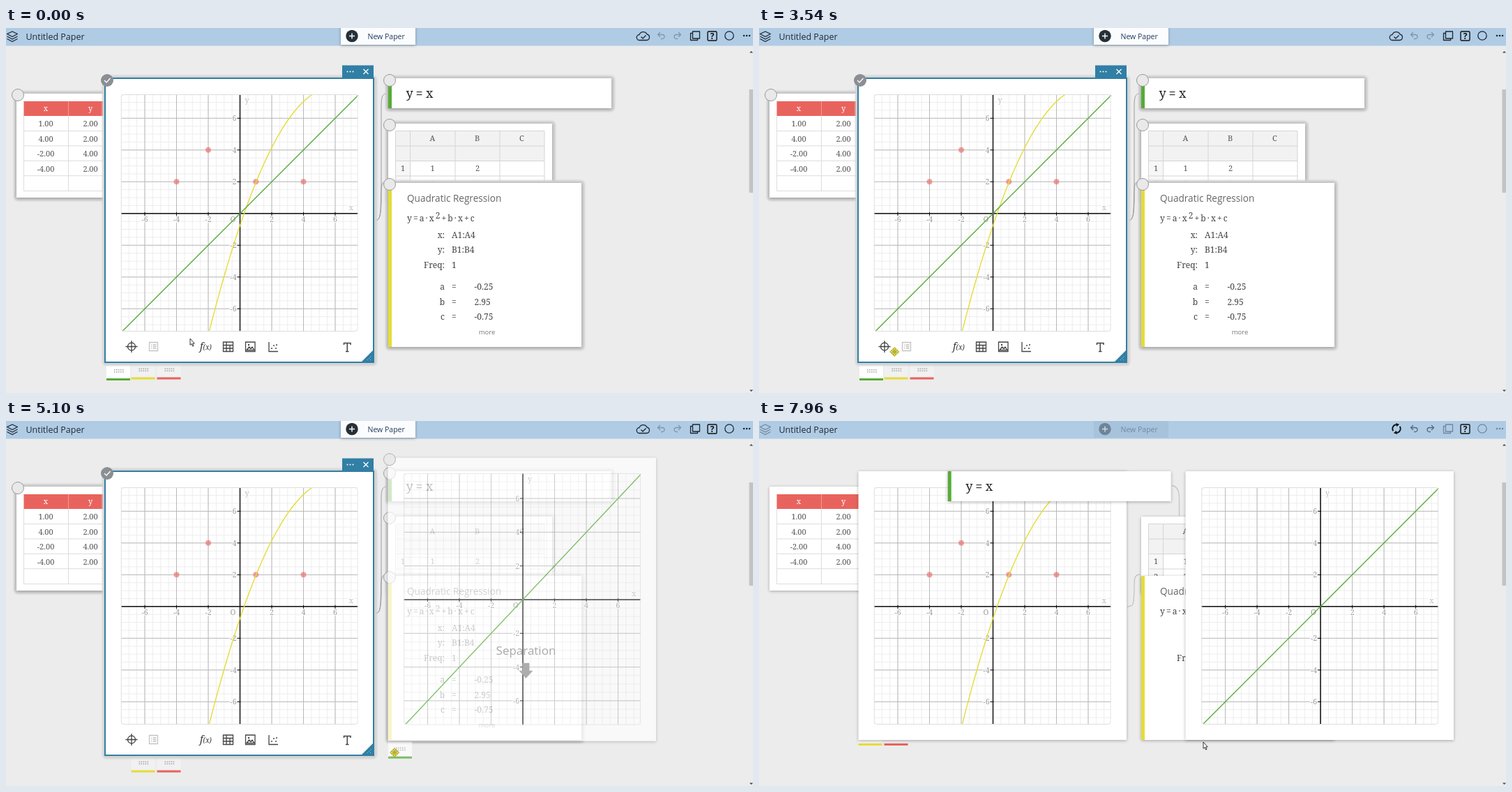
An HTML page for the animation above (8000 ms loop, 1071 by 523 pixels).

```html
<!DOCTYPE html>
<html lang="en">
<head>
<meta charset="utf-8">
<title>Graph paper</title>
<style>
html, body { margin: 0; width: 100%; height: 100%; overflow: hidden; background: #ececec; }
svg { display: block; }
text { font-family: "Noto Serif", serif; font-size: 11px; fill: #555; }
.sans { font-family: "Open Sans", sans-serif; }
.mid { text-anchor: middle; }
.end { text-anchor: end; }
.card { filter: drop-shadow(0 1.5px 2px rgba(0,0,0,.3)); }
.line { fill: none; stroke: #444; stroke-width: 1.3; }
.tick { font-size: 10.5px; fill: #999; paint-order: stroke; stroke: #fff; stroke-width: 2.5px; }
.math { font-size: 12px; fill: #444; }
</style>
</head>
<body>
<svg id="stage" width="1071" height="523" viewBox="0 0 1071 523"></svg>
<script>
const LOOP = 8000;
const GREEN = '#57ab38', YELLOW = '#e5dc38', RED = '#e9635e', TEAL = '#317fa5';
const UNIT = 22.75, SIZE = 340, STEP = 21.34;
const DRAG_START = 3780, DROP = 6710;

const rect = (x, y, w, h, fill, more = '') =>
  `<rect x="${x}" y="${y}" width="${w}" height="${h}" fill="${fill}" ${more}/>`;
const text = (x, y, s, cls = '', style = '') =>
  `<text x="${x}" y="${y}" class="${cls}" style="${style}">${s}</text>`;
const path = (d, stroke = '#444', width = 1, more = '') =>
  `<path d="${d}" fill="none" stroke="${stroke}" stroke-width="${width}" ${more}/>`;
const circle = (x, y, r, fill, more = '') => `<circle cx="${x}" cy="${y}" r="${r}" fill="${fill}" ${more}/>`;
const group = (id, body, more = '') => `<g id="${id}" ${more}>${body}</g>`;
const range = (a, b, step) => Array.from({ length: Math.floor((b - a) / step + 1.001) }, (_, i) => a + i * step);

const handle = (x, y) => circle(x, y, 8.5, '#e9e9e9', 'stroke="#9a9a9a"');
const halo = (x, y, w, h) =>
  rect(x - 4, y - 4, w + 9, h + 9, '#d3d3d3', 'rx="6" class="edit" filter="url(#soft)"');
const card = (x, y, w, h) => halo(x, y, w, h) + rect(x, y, w, h, '#fff', 'class="card"');

function plot(x, y, h, curves) {
  const cx = 170.8, cy = h / 2 + .8, uy = UNIT * h / SIZE;
  const px = v => +(cx + v * UNIT).toFixed(2), py = v => +(cy - v * uy).toFixed(2);
  const grid = step => range(-8, 8, step).map(v => `M${px(v)} 0V${h}M0 ${py(v)}H${SIZE}`).join('');
  const marks = [-6, -4, -2, 2, 4, 6];
  const ticks = marks.map(v => `M${px(v)} ${cy - 2}v5M${cx - 4} ${py(v)}h5`).join('');
  const labels = marks.map(v =>
    text(px(v), cy + 12, v, 'tick mid') + text(cx - 5, py(v) + 4, v, 'tick end')).join('');
  return `<svg x="${x}" y="${y}" width="${SIZE}" height="${h}">` +
    rect(0, 0, SIZE, h, '#fff', 'rx="4"') +
    path(grid(.5), '#ededed', 1) + path(grid(2), '#b9b9b9', 1) + labels +
    text(cx - 14, cy + 12, 'O', 'tick') +
    path(`M0 ${cy}H${SIZE}M${cx} 0V${h}`, '#111', 1.5) + path(ticks, '#111', 1) +
    text(327, cy - 5, 'x', 'tick', 'fill:#bbb') + text(cx + 7, 12, 'y', 'tick', 'fill:#bbb') +
    curves(px, py) +
    rect(.5, .5, SIZE - 1, h - 1, 'none', 'rx="4" stroke="#ddd"') + '</svg>';
}
const identity = (px, py) => path(`M${px(-7.4)} ${py(-7.4)}L${px(7.45)} ${py(7.45)}`, GREEN, 1.4);
const regression = (px, py) =>
  path('M' + range(-1.93, 4.7, .1).map(v => `${px(v)} ${py(-.25 * v * v + 2.95 * v - .75)}`).join('L'), YELLOW, 1.4);
const points = (px, py) => [[-4, 2], [-2, 4], [1, 2], [4, 2]]
  .map(([a, b]) => circle(px(a), py(b), 4, RED, 'opacity=".6"')).join('');

function tab(x, y, color, bg) {
  const dots = range(0, 12, 3).map(d => [0, 3].map(e => rect(x + 11 + d, y + 8 + e, 1.6, 1.6, '#aaa')).join('')).join('');
  return rect(x, y, 34, 21, bg) + dots + rect(x, y + 21, 34, 3, color);
}

function valueTable() {
  const rows = [['1.00', '2.00'], ['4.00', '2.00'], ['-2.00', '4.00'], ['-4.00', '2.00']];
  return card(15, 94, 150, 149) + rect(25.5, 105, 130, 21, RED) +
    path('M89.5 105V126', '#f19a96') +
    text(57, 119, 'x', 'mid', 'fill:#fff') + text(121, 119, 'y', 'mid', 'fill:#fff') +
    path('M25.5 126V233.5H150M89.5 126V233.5' + range(147.5, 212, 21.4).map(y => `M25.5 ${y}H150`).join(''), '#ddd') +
    rows.map((r, i) => r.map((s, j) => text(57 + 64 * j, 141 + i * 21.5, s, 'mid')).join('')).join('') +
    `<g class="edit">${handle(17, 96)}</g>`;
}

function sheet() {
  const xs = [558.5, 579.5, 644, 708, 772];
  return card(548, 137, 235, 110) + rect(558.5, 147.5, 213.5, 43, '#f2f2f2') + rect(558.5, 190, 21, 40, '#f7f7f7') +
    path(xs.map(x => `M${x} 147.5V230`).join('') + [147.5, 169, 190.5, 212].map(y => `M558.5 ${y}H772`).join(''), '#d5d5d5') +
    ['A', 'B', 'C'].map((s, i) => text(611.5 + 64 * i, 162, s, 'mid')).join('') +
    [[1, 1, 2], [2, 2, 4]].map((r, i) => r.map((s, j) =>
      text([569, 611.5, 676][j], 205 + 21.5 * i, s, 'mid')).join('')).join('') +
    `<g class="edit">${handle(550, 139)}</g>`;
}

function regressionCard() {
  const row = (y, a, b) => text(629, y, a, 'math end') + text(639, y, b, 'math');
  const coef = (y, a, b) => row(y, a, '=') + text(671.5, y, b, 'math');
  return card(548, 222, 277, 235) + rect(548, 222, 5, 235, YELLOW) +
    text(575, 249, 'Quadratic Regression', 'sans', 'font-size:13.6px;fill:#666') +
    text(575, 277, 'y=a·x<tspan dy="-4">2</tspan><tspan dy="4">+b·x+c</tspan>', 'math', 'letter-spacing:2.1px') +
    row(301, 'x:', 'A1:A4') + row(322, 'y:', 'B1:B4') + row(343.5, 'Freq:', '1') +
    coef(375, 'a', '-0.25') + coef(397, 'b', '2.95') + coef(418, 'c', '-0.75') +
    text(689.5, 438.5, 'more', 'sans mid', 'font-size:9.5px;fill:#777') +
    `<g class="edit">${handle(550, 224)}</g>`;
}

function equation() {
  const style = 'font-size:18px;fill:#222';
  return card(548, 72, 320, 43) + rect(548, 72, 5, 43, GREEN) +
    text(573.5, 100, 'y', '', style) + text(587.5, 100, '=', '', style) + text(602, 100, 'x', '', style) +
    `<g class="edit">${handle(550, 75)}</g>`;
}

function toolbar() {
  return `<g class="line">
    <circle cx="180" cy="456.5" r="5.5"/><path d="M171.5 456.5h17M180 448v17"/>
    <path stroke="#c4c4c4" d="M205.5 450.5h12v12h-12zM208 454h1m1.500 0h5M208 456.500h1m1.500 0h5M208 459h1m1.500 0h5"/>
    <path d="M311.500 450h14v13.500h-14zM311.500 454.500h14M311.500 459h14M316 450v13.500M321 454.500v9"/>
    <path d="M343.500 450h13.500v13.500h-13.500zM345 461.500l3.500-4.500 2.500 2.500 2-2.500 3 4.500z"/>
    <path d="M377 450v13.500h13"/></g>` +
    circle(348, 454, 1.2, '#444') +
    [[381, 459], [384, 455], [387, 459], [388, 454]].map(([x, y]) => circle(x, y, 1, '#444')).join('') +
    text(278, 461, 'f<tspan style="font-size:10px">(x)</tspan>', '', 'font-size:14px;font-style:italic;fill:#333') +
    path('M484.500 454v-2.500h9.500v2.500M489.250 451.500v12M487 463.500h4.500', '#444', 1.5);
}

function mainPanel() {
  const frame = halo(142, 72, 385, 407) + rect(482, 53.5, 45, 18, TEAL) +
    [489.5, 493.5, 497.5].map(x => circle(x, 62.5, 1, '#fff')).join('') +
    path('M512.500 59l7 7m0-7l-7 7', '#fff', 1.3) +
    rect(142, 72, 385, 407, '#fff', `stroke="${TEAL}" stroke-width="2"`) +
    `<path d="M527 461V479H509z" fill="${TEAL}"/>` + path('M518 476l6-6M522 476l2-2', '#a8cbdc', 1, 'stroke-dasharray="1.500 1.500"') +
    toolbar();
  return group('greenTab', tab(144, 481, GREEN, '#fff'), 'class="own"') +
    `<g class="edit">${tab(179.5, 479.5, YELLOW, '#f1f1f1')}${tab(216.5, 479.5, RED, '#f1f1f1')}${frame}</g>` +
    `<g class="done">${rect(142.500, 455, 34, 7, '#f4f4f4')}${rect(142.500, 462, 34, 3, YELLOW)}${rect(179.500, 462, 34, 3, RED)}` +
    `${rect(142.5, 72, 384.5, 385, '#fff', 'class="card"')}</g>` +
    plot(164.7, 95, SIZE, (px, py) =>
      points(px, py) + regression(px, py) + `<g class="own">${identity(px, py)}</g>`) +
    `<g class="edit">${circle(145, 75, 9, '#8b8e93')}${path('M141 75l3 3 5.500-6', '#fff', 1.3)}</g>`;
}

function copyPanel() {
  return `<g class="edit">${tab(.5, 407, GREEN, '#fff')}${rect(0, 0, 384.5, 406, '#fff', 'class="card"')}${plot(22.8, 22, 361, identity)}` +
    text(198, 282, 'Separation', 'sans mid', 'font-size:17px;fill:#8a8a8a') +
    `<path d="M193 294h10v11h5l-10 11-10-11h5z" fill="#8f9092"/>${handle(2.5, 2.5)}</g>` +
    `<g class="done">${rect(0, 0, 384.5, 385, '#fff', 'class="card"')}${plot(22.8, 23, SIZE, identity)}</g>`;
}

function header() {
  const icon = (d, color = '#1d2731', w = 1.3) => path(d, color, w, 'stroke-linejoin="round"');
  const undo = 'M938 6l-3.500 3.500 3.500 3.500M935 9.500h6a3 3 0 0 1 0 6h-2';
  const redo = 'M964 6l3.500 3.500-3.500 3.500M967 9.500h-6a3 3 0 0 0 0 6h2';
  return rect(0, 0, 1071, 25.5, '#b0cce5') +
    `<g class="fade">${icon('M1.500 8.500L9 5l7.500 3.500L9 12.500zM1.500 12L9 16l7.500-4M1.500 15.500L9 19.500l7.500-4')}</g>` +
    text(28.5, 17, 'Untitled Paper', 'sans', 'font-size:12.5px;fill:#1f2a33') +
    `<g class="ready">${rect(480, -4, 107, 28, '#fbfcfd', 'class="card"')}</g>` +
    `<g class="busy">${rect(480, 0, 107, 24, '#a7c3dc')}</g>` +
    `<g class="fade">${circle(496, 11.5, 8.7, '#263039')}${path('M492 11.500h8M496 7.500v8', '#fff', 1.4)}` +
    text(518.5, 15.5, 'New Paper', 'sans', 'font-size:10.5px;fill:#1f3a5c') + '</g>' +
    `<g class="ready">${icon('M908.500 17.500a4 4 0 0 1-.5-8 6 6 0 0 1 11-.5 4.300 4.300 0 0 1-.5 8.500zM910.500 12.500l2.500 2.500 4.500-4.500')}</g>` +
    `<g class="busy"><g id="spin">${path('M-5.400 2A5.800 5.800 0 0 1 2-5.400M5.400-2A5.800 5.800 0 0 1-2 5.400', '#111', 1.8)}` +
    '<path d="M1-8l4.500 3-4.500 2.500zM-1 8l-4.500-3 4.500-2.500z" fill="#111"/></g></g>' +
    `<g id="history">${icon(undo)}${icon(redo)}</g>` +
    `<g class="fade">${icon('M984.500 5h10v10h-10zM984.500 7.500h-3v10h10v-2.500')}${circle(1037, 11, 6.2, 'none', 'stroke="#1d2731" stroke-width="1.3"')}` +
    [1058, 1062, 1066].map(x => circle(x, 11, 1.3, '#1d2731')).join('') + '</g>' +
    rect(1006, 5, 13, 13, 'none', 'rx="1.500" stroke="#111" stroke-width="1.400"') +
    text(1012.5, 16, '?', 'sans mid', 'font-size:12px;font-weight:bold;fill:#111');
}

function scrollbar() {
  return rect(1065.5, 26, 5.5, 497, '#ececec') + rect(1065.5, 88, 5.5, 148, '#c3c3c3') +
    '<path d="M1066 35.500h5l-2.500-2.500zM1066 518.500h5l-2.500 2.500z" fill="#444"/>';
}

const arrows = [0, 90, 180, 270].map(a =>
  `<path transform="rotate(${a})" d="M0-6.500L2.800-3.500H1V-1H-1V-3.500H-2.800z"/>`).join('');
const stage = document.getElementById('stage');
stage.innerHTML =
  '<defs><filter id="soft" x="-10%" y="-20%" width="120%" height="140%"><feGaussianBlur stdDeviation="1.200"/></filter></defs>' +
  rect(0, 0, 1071, 523, '#ececec') + valueTable() +
  `<g class="edit">${path('M528 276C536 276 537 270 538 250V112C538 98 540 94 546 94M528 276C537 276 537 268 537.500 245C538 225 538 220 546 220', '#9a9a9a')}</g>` +
  `<g class="done">${path('M528 266C538 266 537 262 538 240C538 226 538 220 546 220', '#c4c4c4', 1.3)}</g>` +
  group('link', path('M592 92.500C600 93 602.500 100 602.500 112V136', '#c4c4c4', 1.3)) +
  sheet() + regressionCard() + mainPanel() + group('equation', equation()) +
  group('copy', copyPanel()) + scrollbar() + header() +
  group('pointer', '<path d="M0 0V9.300L2 7.500 3.600 11 5 10.400 3.500 7H6.300z" fill="#fff" stroke="#222" stroke-width=".9"/>') +
  group('mover', arrows, 'stroke-width=".8" stroke-linejoin="round"');

const el = id => document.getElementById(id);
const all = cls => [...stage.querySelectorAll('.' + cls)];
const parts = { edit: all('edit'), done: all('done'), own: all('own'), ready: all('ready'), busy: all('busy'), fade: all('fade') };
const show = (nodes, on) => [].concat(nodes).forEach(n => { n.style.display = on ? '' : 'none'; });
const move = (node, x, y) => node.setAttribute('transform', `translate(${x.toFixed(2)} ${y.toFixed(2)})`);

// time, x, y
const cursorKeys = [
  [0, 264, 445], [829, 264, 445], [830, 262.5, 445], [1030, 262.5, 445], [1700, 206, 463], [1840, 188, 474],
  [2250, 161, 490], [3260, 161, 490], [3540, 194, 464], [4020, 333, 451], [4310, 499, 470], [4680, 499, 470],
  [5100, 557, 475], [5490, 602, 479], [5950, 624, 480], [7450, 624, 480], [7960, 637, 460], [8000, 637, 460]
];
// time, grid column, grid row
const snapKeys = [
  [DRAG_START, 2, -1], [3860, 4, -1], [3940, 5, -2], [4020, 7, -2], [4080, 9, -2], [4160, 11, -2], [4240, 14, -1],
  [4310, 16, -1], [4750, 17, -1], [4930, 18, -1], [5100, 19, -1], [5270, 20, -1], [5430, 21, 0], [5700, 22, 0]
];

function cursorAt(t) {
  const i = cursorKeys.findIndex(k => k[0] > t);
  const [t0, x0, y0] = cursorKeys[i - 1], [t1, x1, y1] = cursorKeys[i];
  const p = (t - t0) / (t1 - t0);
  return [x0 + (x1 - x0) * p, y0 + (y1 - y0) * p];
}

function draw(t) {
  const dropped = t >= DROP, dragging = t >= DRAG_START;
  const busy = (t >= 1400 && t < 2760) || t >= 6860;
  show(parts.edit, !dropped);
  show(parts.done, dropped);
  show(parts.own, !dragging);
  show(parts.ready, !busy);
  show(parts.busy, busy);
  parts.fade.forEach(n => n.setAttribute('opacity', busy ? .42 : 1));
  el('history').setAttribute('opacity', busy ? .6 : .32);
  el('spin').setAttribute('transform', `translate(914 11) rotate(${(t * .36) % 360})`);

  show(el('copy'), dragging);
  if (dragging) {
    const [, col, row] = snapKeys.filter(k => k[0] <= t).pop();
    move(el('copy'), 142 + col * STEP, dropped ? 72 : 74 + row * STEP);
    el('copy').setAttribute('opacity', dropped ? 1 : .73);
  }

  const p = Math.min(1, Math.max(0, (t - 6780) / 420));
  move(el('equation'), -277.3 * (1 - (1 - p) ** 3), 0);
  show(el('link'), p === 1);

  const [x, y] = cursorAt(t);
  const mover = t >= 2250 && t < 6640, pressed = t >= 3020 && t < 6410;
  show(el('pointer'), !mover);
  show(el('mover'), mover);
  move(el('pointer'), x, y);
  move(el('mover'), x, y);
  el('mover').setAttribute('fill', pressed ? '#f4ea1c' : '#fff');
  el('mover').setAttribute('stroke', pressed ? '#8a8416' : '#222');
}

const start = performance.now();
function tick() {
  draw((performance.now() - start) % LOOP);
  requestAnimationFrame(tick);
}
tick();
</script>
</body>
</html>
```
